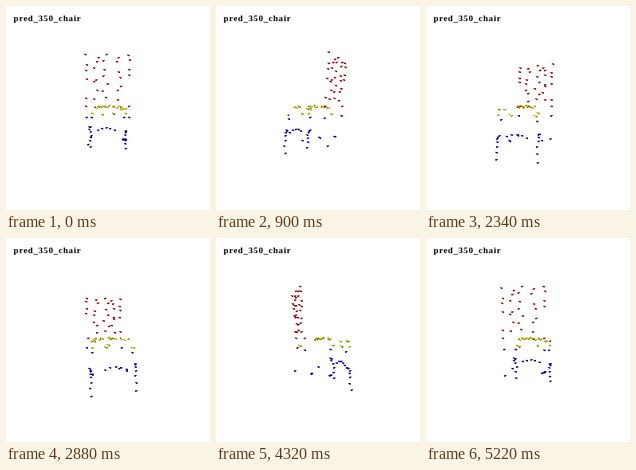
An HTML page with a canvas that plays this animation: 256 by 256 pixels, repeating every 5400 ms.

```html
<!DOCTYPE html>
<html lang="en">
<head>
<meta charset="utf-8">
<title>Turning chair</title>
<style>
  html, body { margin: 0; width: 100%; height: 100%; overflow: hidden; background: #fff; }
  canvas { position: absolute; left: 0; top: 0; }
  h1 {
    position: absolute; left: 9.5px; top: 9px; margin: 0; color: #000;
    font: bold 11px/13px "Liberation Serif", "Noto Serif", serif;
    letter-spacing: 0.8px; white-space: pre;
  }
</style>
</head>
<body>
<canvas id="stage" width="256" height="256"></canvas>
<h1>pred_350_chair</h1>
<script>
const STEP_MS = 180, STEPS = 30;
const CAMERA = 220, CX = 128, CY = 127;
const RED = [205, 0, 0], YELLOW = [235, 225, 0], BLUE = [0, 0, 205];
const ctx = document.getElementById('stage').getContext('2d');

let seed = 350;
function random() {
  seed = (seed * 1664525 + 1013904223) % 4294967296;
  return seed / 4294967296;
}
const jitter = r => (random() * 2 - 1) * r;
const mix = (a, b, t) => a + (b - a) * t;

// x runs across, d away from the front, h upwards from the seat
const cloud = [];
function add(color, x, d, h) {
  cloud.push({ color, x, d, h, side: random() < 0.5 ? -2 : 1 });
}

function scatter(color, n, x, d, h, spread, rise = 1) {
  for (let i = 0; i < n; i++) {
    add(color, x + jitter(spread), d + jitter(spread), h + jitter(rise));
  }
}

function backrest() {
  const lean = h => 23 + h * 0.08;
  for (let row = 0; row < 7; row++) {
    for (const x of [-24, -12, -3, 12, 24]) {
      const outer = Math.abs(x) === 24;
      if (outer && row < 3) continue;
      const h = 10 + row * 7.8 + jitter(3);
      add(RED, x + jitter(outer ? 1 : 3), lean(h), h);
    }
  }
  for (const x of [-24, 23]) add(RED, x, lean(0), 1);
  add(RED, -24, lean(10), 10);
}

function seat() {
  scatter(YELLOW, 7, 12, 5, 0, 5);
  scatter(YELLOW, 7, -4, -5, 1, 5);
  scatter(YELLOW, 4, -14, -18, 0, 6);
  scatter(YELLOW, 4, 21, -26, -3, 4);
  scatter(YELLOW, 2, -5, 21, -8, 1);
  for (const x of [-23, 7, 25]) scatter(YELLOW, 2, x, -30, -9, 1.5);
}

function frontLeg(x, top, foot) {
  const n = 7;
  for (let i = 0; i < n; i++) {
    const t = i / (n - 1);
    add(BLUE, x + jitter(1), mix(-28, -33, t) + jitter(1), mix(top, foot, t * t));
  }
  add(BLUE, x * 0.92, -27, -15);
}

function legs() {
  frontLeg(-25, -28, -57);
  frontLeg(25, -34, -60);
  for (const x of [-24, 24]) add(BLUE, x, 22, -12);
  add(BLUE, -22, 25, -42);

  scatter(BLUE, 2, 21, 14, -39, 1);
  scatter(BLUE, 2, 21, -9, -42, 1);
  add(BLUE, -22, -8, -39);

  // Arched rail between the front legs
  for (let x = -14; x <= 10; x += 6) {
    add(BLUE, x, -33, -30 - 3 * ((x + 2) / 12) ** 2);
  }
}

function project(p, angle) {
  const c = Math.cos(angle), s = Math.sin(angle);
  const near = p.d * c - p.x * s;
  const scale = CAMERA / (CAMERA - near);
  return {
    x: Math.round(CX + (p.x * c + p.d * s) * scale),
    y: Math.round(CY - p.h * scale),
    near, color: p.color, side: p.side
  };
}

const shade = (color, k) => `rgb(${color.map(v => Math.round(v * k)).join(',')})`;

function dot({ x, y, color, side }) {
  ctx.fillStyle = shade(color, 1);
  ctx.fillRect(x - 1, y - 1, 2, 2);
  ctx.fillStyle = shade(color, 0.3);
  ctx.fillRect(x + side, y - 1, 1, 1);
  ctx.fillRect(x, y, 1, 1);
}

function draw(step) {
  const angle = step / STEPS * Math.PI * 2;
  ctx.fillStyle = '#fff';
  ctx.fillRect(0, 0, 256, 256);
  cloud.map(p => project(p, angle))
    .sort((a, b) => a.near - b.near)
    .forEach(dot);
}

backrest();
seat();
legs();

let shown = -1;
const start = performance.now();
function tick() {
  const step = Math.floor(Math.max(0, performance.now() - start) / STEP_MS) % STEPS;
  if (step !== shown) draw(shown = step);
  requestAnimationFrame(tick);
}
tick();
</script>
</body>
</html>
```
